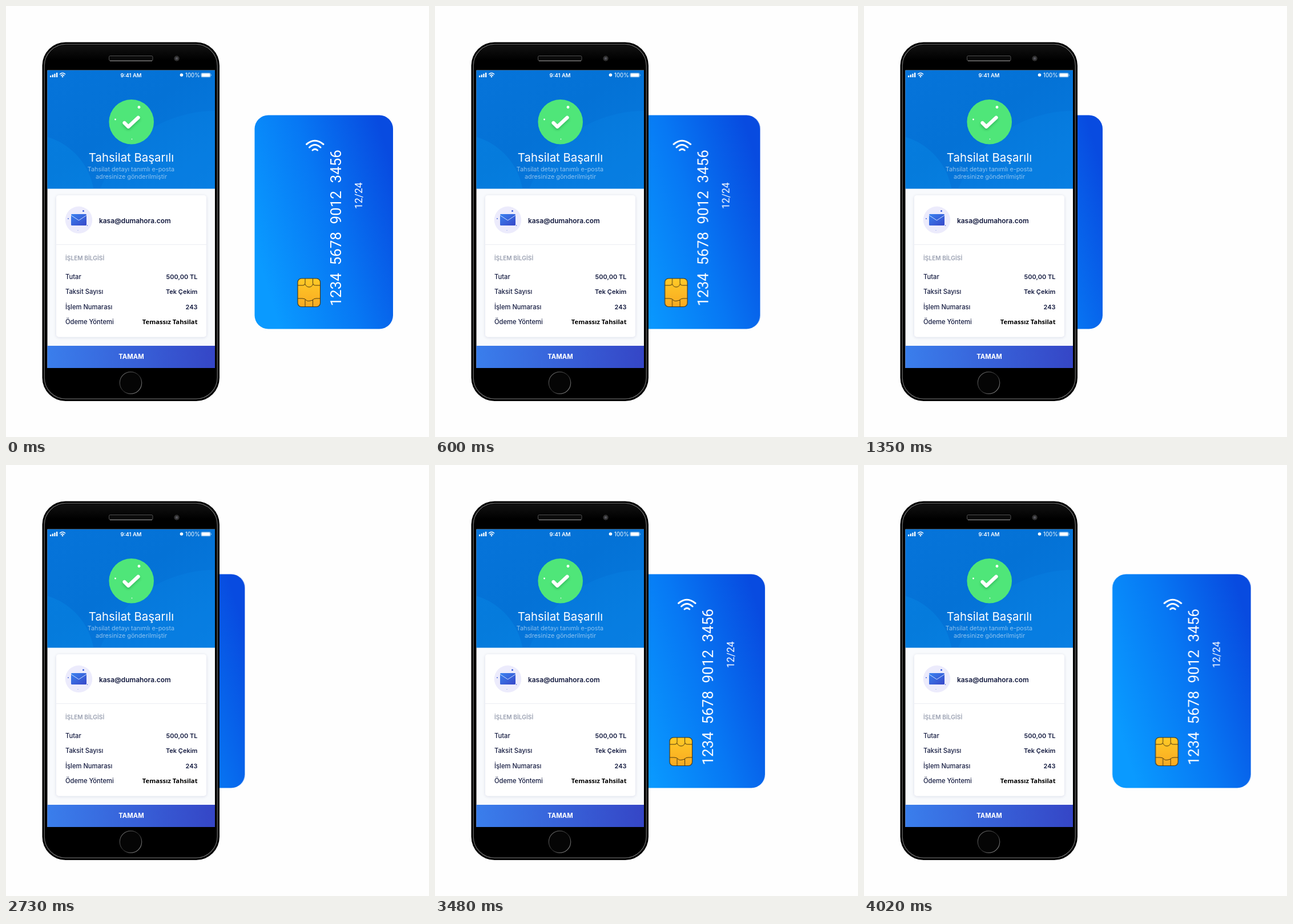
An HTML page for the animation above (4050 ms loop, 741 by 756 pixels).

```html
<!DOCTYPE html>
<html lang="tr">
<head>
<meta charset="utf-8">
<title>Temassız Tahsilat</title>
<style>
  html, body { margin: 0; width: 100%; height: 100%; overflow: hidden; background: #fefefe; }
  svg { display: block; width: 741px; height: 756px; font-family: Inter, "Noto Sans", sans-serif; }
  .mid { text-anchor: middle; }
  .line { fill: none; stroke-linecap: round; stroke-linejoin: round; }
  .digits { font-family: Roboto, sans-serif; font-weight: 400; fill: #fff; }
  .row { font-size: 11.2px; font-weight: 500; fill: #141b40; }
  .value { font-size: 11px; font-weight: 600; text-anchor: end; }
  .value.method { font: 700 11.2px "Open Sans", sans-serif; fill: #000; }
</style>
</head>
<body>
<svg viewBox="0 0 741 756">
  <defs>
    <linearGradient id="cardFill" gradientUnits="userSpaceOnUse" x1="436" y1="425" x2="696" y2="345">
      <stop offset="0" stop-color="#0a9aff"/>
      <stop offset=".5" stop-color="#0778f4"/>
      <stop offset="1" stop-color="#084be0"/>
    </linearGradient>
    <linearGradient id="chipFill" x2="0" y2="1">
      <stop offset="0" stop-color="#ffca27"/>
      <stop offset="1" stop-color="#f9aa22"/>
    </linearGradient>
    <linearGradient id="headFill" x2="1" y2="1">
      <stop offset="0" stop-color="#0674da"/>
      <stop offset=".45" stop-color="#0472d6"/>
      <stop offset="1" stop-color="#077be0"/>
    </linearGradient>
    <linearGradient id="buttonFill">
      <stop offset="0" stop-color="#3a7eec"/>
      <stop offset="1" stop-color="#3546c6"/>
    </linearGradient>
    <linearGradient id="mailFill" x2="1" y2="1">
      <stop offset="0" stop-color="#3a82f0"/>
      <stop offset="1" stop-color="#3747c8"/>
    </linearGradient>
    <linearGradient id="topShade" x2="0" y2="1">
      <stop offset="0" stop-color="#222"/>
      <stop offset=".6" stop-color="#000"/>
    </linearGradient>
    <linearGradient id="homeRim" x2="1" y2="1">
      <stop offset="0" stop-color="#777"/>
      <stop offset=".5" stop-color="#222"/>
      <stop offset="1" stop-color="#999"/>
    </linearGradient>
    <filter id="soft" x="-10%" y="-10%" width="120%" height="120%">
      <feDropShadow dx="0" dy="1" stdDeviation="2.5" flood-color="#1c2a50" flood-opacity=".13"/>
    </filter>
    <filter id="tickShadow" x="-30%" y="-30%" width="160%" height="180%">
      <feDropShadow dx="0" dy="3" stdDeviation="2" flood-color="#0a7a35" flood-opacity=".35"/>
    </filter>
    <clipPath id="headClip"><path d="M72.500 112.700H366V320.500H72.500Z"/></clipPath>
  </defs>

  <g id="card">
    <rect x="435.500" y="191.500" width="242.500" height="375" rx="24" fill="url(#cardFill)"/>
    <g class="line" stroke="#fff" stroke-width="3">
      <path d="M526.500 242.500Q541 230 556 242.500"/>
      <path d="M531.500 248Q541 239 551 248"/>
      <path d="M537 253Q541.300 249 545.600 253"/>
    </g>
    <g class="digits" id="number" font-size="26"></g>
    <text class="digits" font-size="17.500" transform="translate(623.500 356) rotate(-90)">12/24</text>
    <rect x="511" y="478" width="39.500" height="49.500" rx="6.500" fill="url(#chipFill)" stroke="#3d3217" stroke-width="1.100"/>
    <g class="line" stroke="#4b3a12" stroke-width="1">
      <path d="M524 478.500V486Q524 490 520 490H511.500M537.500 478.500V486Q537.500 490 541.500 490H550"/>
      <path d="M524 488Q526 493 531 493T537.500 488M511.500 513H519Q524 513 526 516T537 516Q539 513 543 513H550"/>
      <path d="M524 515V527M537.500 515V527"/>
    </g>
  </g>

  <g id="phone">
    <rect x="63.500" y="63.500" width="310.500" height="629.500" rx="41"/>
    <rect x="67.200" y="67.200" width="303" height="622" rx="37.500" fill="none" stroke="#666" stroke-width="1.300"/>
    <path d="M72 112V104Q72 69 107 69H331Q366 69 366 104V112Z" fill="url(#topShade)" opacity=".5"/>
    <rect x="180.500" y="87.500" width="76.500" height="8.500" rx="2" fill="#0b0b0b" stroke="#505050"/>
    <path d="M182 96.300H256" stroke="#8a8a8a"/>
    <circle cx="299" cy="92" r="4.700" fill="#303030"/>
    <circle cx="299" cy="92" r="2.200" fill="#55555c"/>
    <circle cx="218.500" cy="661" r="19.200" fill="#050505" stroke="url(#homeRim)" stroke-width="1.200"/>

    <rect x="72.500" y="112.700" width="293.500" height="522.300" fill="#f8fafd"/>
    <g clip-path="url(#headClip)">
      <rect x="72" y="112" width="294" height="209" fill="url(#headFill)"/>
      <circle cx="366" cy="400" r="216" fill="#149bf5" opacity=".13"/>
      <circle cx="40" cy="340" r="115" fill="#0aa0f5" opacity=".2"/>
    </g>

    <g fill="#fff">
      <path d="M77 122h2.300v3H77zM80.700 120.500H83v4.500h-2.300zM84.300 118.800h2.300v6.200h-2.300zM88 117h2.300v8H88z"/>
      <path class="line" d="M94.500 119.500Q99 115.500 103.500 119.500M96.400 122Q99 119.800 101.600 122" stroke="#fff" stroke-width="1.600" style="fill: none"/>
      <circle cx="99" cy="124" r="1.300"/>
      <text class="mid" x="219" y="124.700" font-size="9.500" font-weight="600">9:41 AM</text>
      <circle cx="307.500" cy="121" r="2.800"/>
      <text x="314" y="124.700" font-size="9.700">100%</text>
      <rect x="341.500" y="117.500" width="17" height="7.500" rx="2" fill="none" stroke="#fff" stroke-opacity=".5" stroke-width=".8"/>
      <rect x="342.500" y="118.300" width="15" height="6" rx="1.200"/>
      <path d="M359.500 119.800q1.500 1.500 0 3z"/>
    </g>

    <circle cx="219.700" cy="203.300" r="39.300" fill="#4fe679"/>
    <path class="line" d="M207.500 205L214.300 211.700L231.500 195.700" stroke="#fff" stroke-width="6.200" filter="url(#tickShadow)"/>
    <g fill="#fff">
      <circle cx="233" cy="177.500" r="2.400"/>
      <circle cx="191.500" cy="199" r="1.400"/>
      <circle cx="220.500" cy="233.500" r=".9" opacity=".8"/>
      <text class="mid" x="219.500" y="272.700" font-size="20.400">Tahsilat Başarılı</text>
      <g class="mid" font-size="10.800" fill-opacity=".55">
        <text x="219" y="289.500">Tahsilat detayı tanımlı e-posta</text>
        <text x="219.500" y="303">adresinize gönderilmiştir</text>
      </g>
    </g>

    <rect x="88" y="332" width="263" height="248.500" rx="5" fill="#fff" filter="url(#soft)"/>
    <path d="M88 418.500H351" stroke="#eceef3"/>
    <circle cx="127.500" cy="375.300" r="23.700" fill="#ecebfc"/>
    <rect x="114" y="365" width="27" height="20" rx="1.500" fill="url(#mailFill)"/>
    <path class="line" d="M114.500 367.500L127.500 376L140.500 367.500" stroke="#cfe0ff" stroke-width="1"/>
    <g fill="#3a5bd9">
      <circle cx="135.500" cy="359.500" r="1.500"/>
      <circle cx="109" cy="373" r=".9"/>
      <circle cx="142.500" cy="385" r=".8"/>
      <circle cx="126" cy="393.500" r=".6" opacity=".6"/>
    </g>
    <text x="163" y="381.300" font-size="11.900" font-weight="600" fill="#10173c">kasa@dumahora.com</text>
    <text x="104" y="446.300" font-size="10.200" font-weight="600" fill="#9aa0b1">İŞLEM BİLGİSİ</text>
    <g id="rows"></g>

    <rect x="72.500" y="596" width="293.500" height="39" fill="url(#buttonFill)"/>
    <text class="mid" x="219.500" y="619.300" font-size="11.300" font-weight="700" fill="#fff">TAMAM</text>
  </g>
</svg>
<script>
  const $ = id => document.getElementById(id);

  function addText(parent, text, attrs) {
    const node = document.createElementNS(parent.namespaceURI, 'text');
    for (const name in attrs) node.setAttribute(name, attrs[name]);
    node.textContent = text;
    parent.append(node);
  }

  ['1234', '5678', '9012', '3456'].forEach((digits, i) =>
    addText($('number'), digits, { transform: `translate(587.3 ${526.5 - i * 72}) rotate(-90)` }));

  [
    ['Tutar', '500,00 TL'],
    ['Taksit Sayısı', 'Tek Çekim'],
    ['İşlem Numarası', '243'],
    ['Ödeme Yöntemi', 'Temassız Tahsilat', 'method']
  ].forEach(([label, value, extra = ''], i) => {
    const y = 478.7 + i * 26.5;
    addText($('rows'), label, { class: 'row', x: 104, y });
    addText($('rows'), value, { class: `row value ${extra}`, x: 335.5, y });
  });

  // The card slides behind the phone, waits, and slides back, in 30 ms steps.
  const LOOP = 4050, STEP = 30, SLIDE = 1350, RETURN = 2700, TRAVEL = 260;
  const smooth = u => {
    const c = Math.min(1, Math.max(0, u));
    return c * c * (3 - 2 * c);
  };
  const shift = t => TRAVEL * (smooth((t - RETURN) / SLIDE) - smooth(t / SLIDE));

  const count = LOOP / STEP;
  const keyframes = Array.from({ length: count + 1 }, (_, i) => ({
    offset: i / count,
    transform: `translateX(${shift(i * STEP).toFixed(2)}px)`,
    easing: 'steps(1, end)'
  }));
  $('card').animate(keyframes, { duration: LOOP, iterations: Infinity });
</script>
</body>
</html>
```
